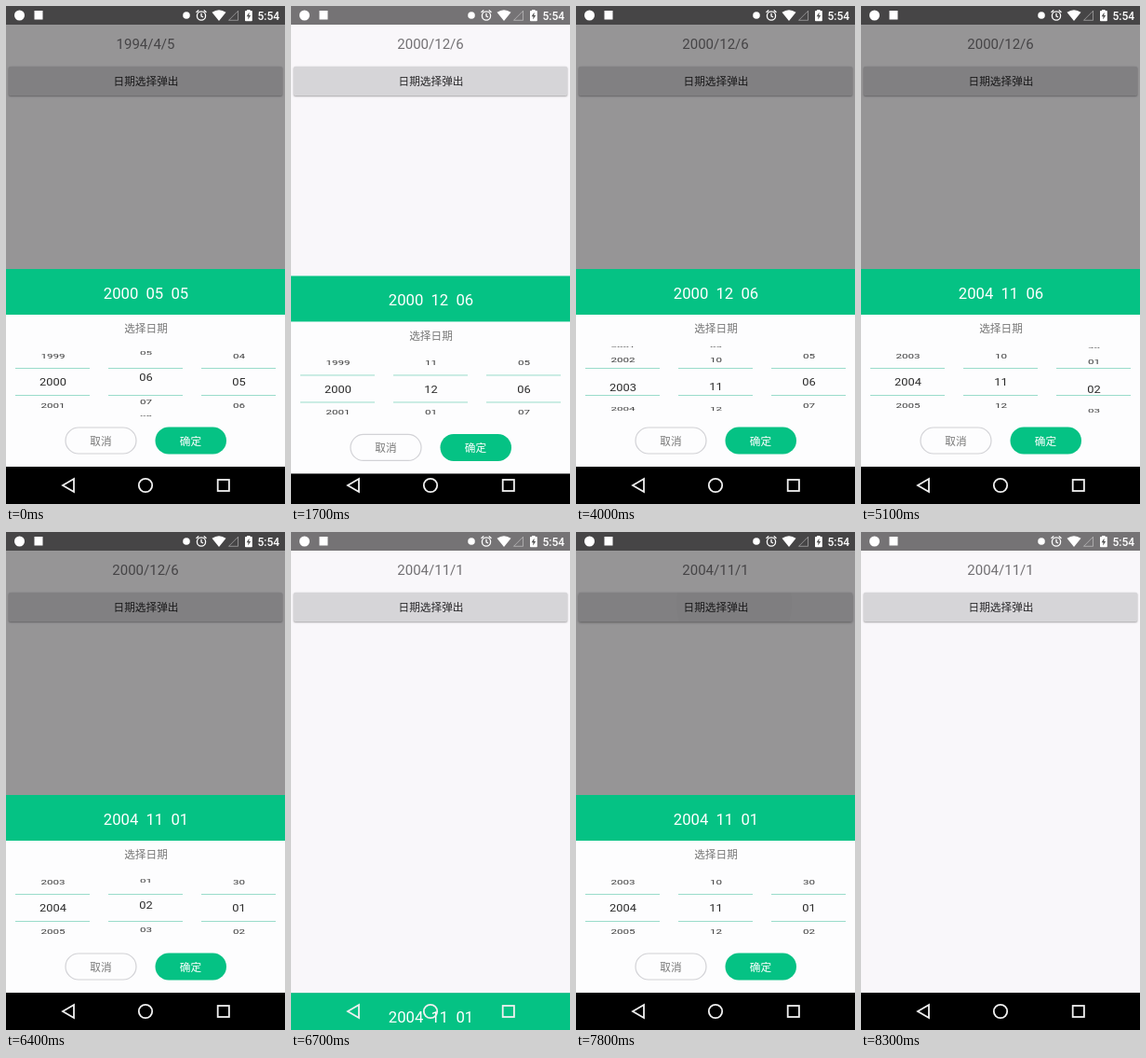
Write an HTML page with a canvas that moves like this. It is 300 by 534 pixels and loops after 8.4 s.

```html
<!DOCTYPE html>
<html lang="zh-CN">
<meta charset="utf-8">
<title>日期选择</title>
<style>
  html, body { margin: 0; width: 100%; height: 100%; overflow: hidden; background: #000; }
  canvas { display: block; width: 300px; height: 534px; }
</style>
<canvas id="stage" width="300" height="534"></canvas>
<script>
const ctx = document.getElementById('stage').getContext('2d');
const LOOP = 8400, SLIDE = 400, SHEET_TOP = 282, SHEET_HEIGHT = 212;
const GREEN = '#05c284';
const RADIUS = 37.5, STEP = Math.PI / 4;   // wheel cylinder: four rows per half turn

// Tracks are [time, value] points.
const TITLES = [[0, '1994/4/5'], [1657, '2000/12/6'], [6405, '2004/11/1']];
const SESSIONS = [
  { open: -900, close: 1657,
    head: [[0, '2000  05  05'], [650, '2000  12  05'], [950, '2000  12  06']],
    year: [[0, 2000]], month: [[0, 6.17], [620, 12]], day: [[500, 5], [920, 6]] },
  { open: 2800, close: 6405, touch: [179, 80],
    head: [[0, '2000  12  06'], [4450, '2004  12  06'], [4650, '2004  11  06'], [5550, '2004  11  01']],
    year: [[3550, 2000], [3600, 2000], [4400, 2004]],
    month: [[3600, 12], [4000, 10.83], [4200, 10.83], [4400, 11], [5900, 11], [6400, 14.1], [6600, 14]],
    day: [[4500, 6], [5400, 1]] },
  { open: 7300, close: 7898, touch: [170, 77],
    head: [[0, '2004  11  01']], year: [[0, 2004]], month: [[0, 11]], day: [[0, 1]] }
];

const clamp = v => Math.max(0, Math.min(1, v));
const smooth = p => (1 - Math.cos(Math.PI * clamp(p))) / 2;
const pad = n => String(n).padStart(2, '0');
const wrap = (n, size) => ((n - 1) % size + size) % size + 1;

function latest(track, t) {
  return track.filter(([time]) => time <= t).pop()[1];
}

function glide(track, t) {
  let value = track[0][1];
  for (let i = 1; i < track.length; i++) {
    const [t0, v0] = track[i - 1], [t1, v1] = track[i];
    if (t >= t0) value = v0 + (v1 - v0) * (1 - (1 - clamp((t - t0) / (t1 - t0))) ** 1.75);
  }
  return value;
}

function rect(x, y, w, h, color) {
  ctx.fillStyle = color;
  ctx.fillRect(x, y, w, h);
}

function pill(x, y, w, h, r) {
  ctx.beginPath();
  ctx.roundRect(x, y, w, h, r);
}

function poly(...points) {
  ctx.beginPath();
  for (let i = 0; i < points.length; i += 2) ctx.lineTo(points[i], points[i + 1]);
  ctx.closePath();
}

function circle(x, y, r) {
  ctx.beginPath();
  ctx.arc(x, y, r, 0, 7);
}

function text(str, x, centerY, size, color, weight = 400) {
  ctx.font = `${weight} ${size}px Roboto, "Noto Sans CJK SC", "Noto Sans CJK", sans-serif`;
  ctx.textAlign = 'center';
  ctx.fillStyle = color;
  ctx.fillText(str, x, centerY + size * 0.36);
}

function drawPage(t, session, dimmed) {
  rect(0, 0, 300, 494, '#f9f7fa');
  text(latest(TITLES, t), 150, 41, 15, '#737174');

  const press = session && session.touch ? 1 - clamp((t - session.open) / 650) : 0;
  ctx.save();
  ctx.shadowColor = 'rgba(0,0,0,.4)';
  ctx.shadowBlur = 2 + 4 * press;
  ctx.shadowOffsetY = 0.7 + press;
  pill(3, 65, 294, 31, 1.5);
  ctx.fillStyle = '#d6d5d8';
  ctx.fill();
  ctx.restore();
  if (press) {
    ctx.save();
    ctx.clip();
    circle(...session.touch, 16 + 60 * (1 - press));
    ctx.fillStyle = `rgba(0,0,0,${0.07 * press})`;
    ctx.fill();
    ctx.restore();
  }
  text('日期选择弹出', 150.5, 80.5, 11.67, '#2b2a2c');

  rect(0, 0, 300, 20, '#757375');
  if (dimmed) rect(0, 0, 300, 494, 'rgba(0,0,0,.4)');
}

function drawWheel(x, pos, label) {
  const rows = (scaleX, squash, color) => {
    for (let i = Math.floor(pos) - 2; i <= pos + 3; i++) {
      const angle = (i - pos) * STEP, scaleY = Math.cos(angle);
      if (Math.abs(angle) > 1.5) continue;
      ctx.save();
      ctx.translate(x, 403 + RADIUS * Math.sin(angle) - (1 - squash) * scaleY * 6.8);
      ctx.scale(scaleX, scaleY * squash);
      text(label(i), 0, 0, 11.67, color);
      ctx.restore();
    }
  };
  const clipped = (bands, draw) => {
    ctx.save();
    ctx.beginPath();
    for (const [y, h] of bands) ctx.rect(x - 40, y, 80, h);
    ctx.clip();
    draw();
    ctx.restore();
  };
  clipped([[365, 23], [418, 22]], () => rows(1, 0.8, '#3c3c3c'));
  clipped([[388, 30]], () => rows(1.1, 1, '#2a2a2a'));
  rect(x - 40.5, 388, 80, 1, '#9adccb');
  rect(x - 40.5, 417, 80, 1, '#9adccb');
}

function drawSheet(t, session, shift) {
  ctx.save();
  ctx.translate(0, shift);
  rect(0, SHEET_TOP, 300, SHEET_HEIGHT, '#fdfdfe');
  rect(0, SHEET_TOP, 300, 49, GREEN);
  text(latest(session.head, t), 150.5, 307.5, 16.67, '#fff');
  text('选择日期', 150.5, 346, 11.67, '#777');
  drawWheel(50.5, glide(session.year, t), String);
  drawWheel(150.5, glide(session.month, t), n => pad(wrap(n, 12)));
  drawWheel(250.5, glide(session.day, t), n => pad(wrap(n, 30)));

  pill(64, 452, 76, 28, 14);
  ctx.strokeStyle = '#d2d2d6';
  ctx.lineWidth = 1.2;
  ctx.stroke();
  text('取消', 102, 466.5, 11.67, '#777');
  pill(160.5, 451.5, 76.5, 29, 14.5);
  ctx.fillStyle = GREEN;
  ctx.fill();
  text('确定', 198.5, 466.5, 11.67, '#fff', 500);
  ctx.restore();
}

function drawSystemIcons() {
  ctx.fillStyle = ctx.strokeStyle = '#fff';
  circle(14.5, 10, 5.5); ctx.fill();
  ctx.fillRect(30.5, 5, 9, 9.5);
  circle(194, 10, 3.8); ctx.fill();

  // alarm clock
  ctx.lineWidth = 1.3;
  circle(210, 10.5, 4.6); ctx.stroke();
  ctx.beginPath();
  ctx.moveTo(210, 7.8); ctx.lineTo(210, 10.8); ctx.lineTo(212, 12);
  ctx.moveTo(204.5, 6.8); ctx.lineTo(207.3, 4.4);
  ctx.moveTo(215.5, 6.8); ctx.lineTo(212.7, 4.4);
  ctx.stroke();

  // wifi and signal
  ctx.beginPath();
  ctx.moveTo(229, 16); ctx.lineTo(221.5, 6.8);
  ctx.quadraticCurveTo(229, 1.6, 236.5, 6.8);
  ctx.fill();
  ctx.strokeStyle = 'rgba(255,255,255,.4)';
  ctx.lineWidth = 1;
  poly(239.5, 15.3, 249.5, 15.3, 249.5, 5.3); ctx.stroke();

  // battery
  ctx.fillRect(259, 4, 3.5, 2);
  pill(257, 5, 7.8, 11.2, 0.8); ctx.fill();
  poly(261.5, 6.8, 258.6, 11.2, 260.5, 11.2, 260.2, 14.6, 263.2, 10, 261.4, 10);
  ctx.fillStyle = '#555';
  ctx.fill();
  text('5:54', 282.3, 10.3, 12, '#fff', 500);

  // navigation
  ctx.strokeStyle = '#f0f0f0';
  ctx.lineWidth = 1.8;
  poly(61, 514, 73, 507, 73, 521); ctx.stroke();
  circle(150, 514, 7.2); ctx.stroke();
  ctx.strokeRect(227.7, 508, 12.2, 12);
}

function frame() {
  const t = performance.now() % LOOP;
  const session = SESSIONS.find(s => t >= s.open && t < s.close + SLIDE);
  rect(0, 0, 300, 534, '#000');
  drawPage(t, session, session && t < session.close);
  if (session) {
    const hidden = 1 - smooth((t - session.open) / SLIDE) + smooth((t - session.close) / SLIDE);
    drawSheet(t, session, hidden * (534 - SHEET_TOP));
  }
  drawSystemIcons();
  requestAnimationFrame(frame);
}
frame();
</script>
</html>
```
